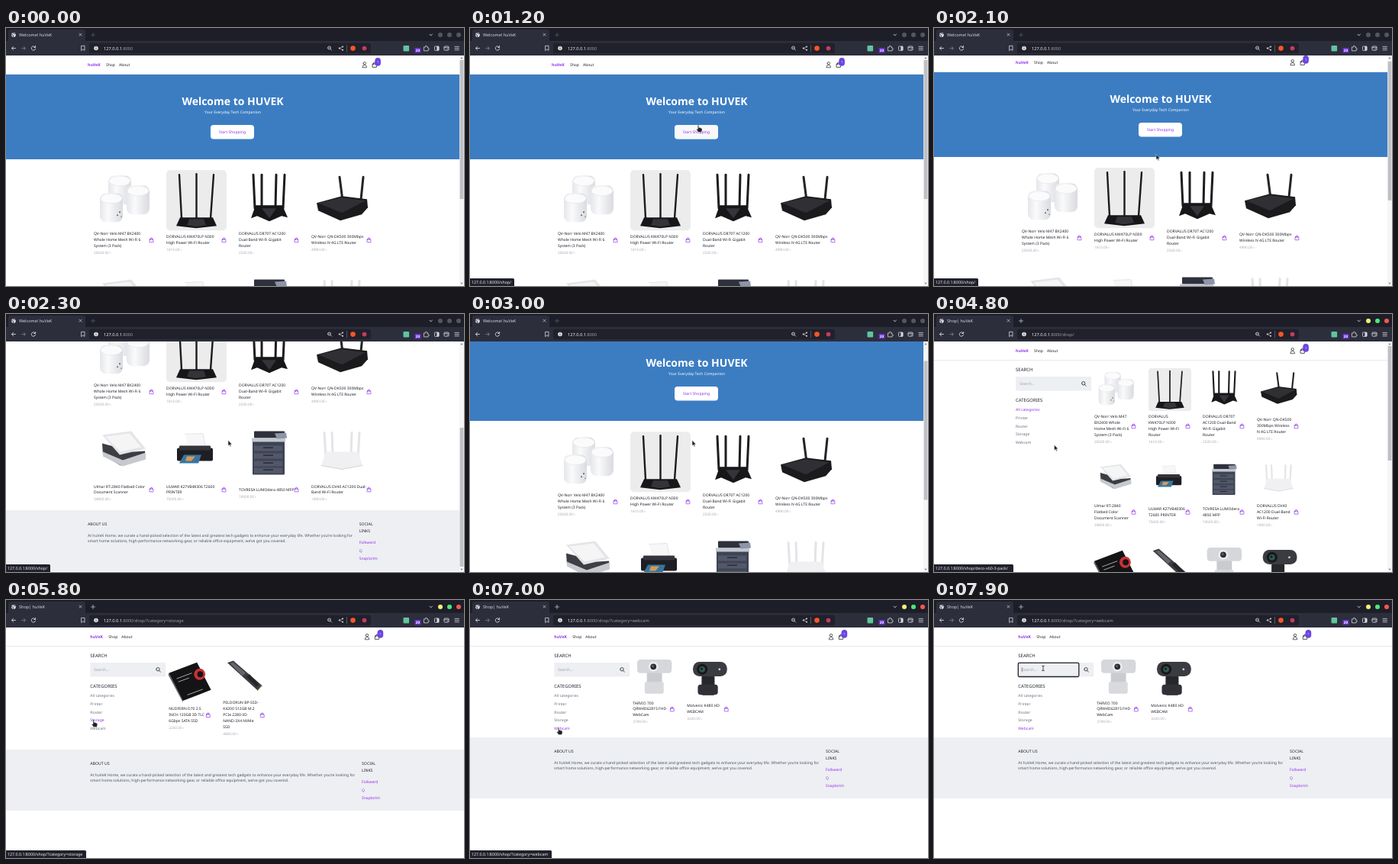
Animation, 600 px wide and 338 px high, one loop 8 s. Source, as an HTML page:

```html
<!DOCTYPE html>
<html lang="en">
<head>
<meta charset="utf-8">
<title>Shop tour</title>
<style>
  html, body { margin: 0; width: 100%; height: 100%; overflow: hidden; background: #fff; }
  svg { display: block; width: 100%; height: 100%; }
  text { font-family: "Noto Sans", "Open Sans", sans-serif; text-rendering: geometricPrecision; white-space: pre; }
  .line { fill: none; stroke-linecap: round; stroke-linejoin: round; }
</style>
</head>
<body>
<svg id="stage" viewBox="0 0 600 338"></svg>
<script>
const LOOP = 8000;
const INK = '#20222b', GRAY = '#6b7280', PALE = '#a3a8b2', PURPLE = '#9333ea', PANEL = '#edeff2';
const BAR = '#2d2e3b', DARK = '#20212b', LIGHT = '#d6d7df';

// --- drawing helpers ---
const text = (x, y, str, { size = 5, fill = INK, weight = 400, anchor = 'start', id = '' } = {}) =>
  `<text ${id && `id="${id}"`} x="${x}" y="${y}" font-size="${size}" fill="${fill}" font-weight="${weight}" text-anchor="${anchor}">${str}</text>`;
const rect = (x, y, w, h, fill, rx = 0, extra = '') =>
  `<rect x="${x}" y="${y}" width="${w}" height="${h}" fill="${fill}" rx="${rx}" ${extra}/>`;
const dot = (x, y, r, fill) => `<circle cx="${x}" cy="${y}" r="${r}" fill="${fill}"/>`;
const poly = (points, fill) => `<polygon points="${points}" fill="${fill}"/>`;
const line = (d, stroke, width = 1, extra = '') =>
  `<path class="line" d="${d}" stroke="${stroke}" stroke-width="${width}" ${extra}/>`;
const group = (id, body) => `<g id="${id}">${body}</g>`;

const bag = (x, y, color, scale = 0.29) => line(
  'M15.8 10.5V6a3.8 3.8 0 1 0-7.5 0v4.5M4.4 8.5 3.1 20.5q0 1.2 1.1 1.2h15.5q1.2 0 1.1-1.2l-1.3-12q-.1-1-1.1-1H5.5q-1 0-1.1 1z',
  color, 2.4, `transform="translate(${x} ${y}) scale(${scale}) translate(-12 -12)"`);
const magnifier = (x, y, color, r = 2.2) =>
  line(`M${x - r} ${y}a${r} ${r} 0 1 1 ${2 * r} 0a${r} ${r} 0 1 1 ${-2 * r} 0M${x + r * .75} ${y + r * .75}l${r * .8} ${r * .8}`, color, .8);

// --- product pictures, each in a 79 x 79 box ---
const pod = (x, y) =>
  rect(x, y, 30, 38, 'url(#pod)', 8) + `<ellipse cx="${x + 15}" cy="${y + 7}" rx="14" ry="6.5" fill="#fbfbfc" stroke="#dcdee2" stroke-width=".5"/>`;
const mast = (x1, y1, x2, y2, color, width = 2.4) => line(`M${x1} ${y1}L${x2} ${y2}`, color, width);
const art = {
  mesh: pod(19, 7) + pod(43, 20) + pod(8, 30) + dot(34, 55, 1, '#555') + dot(31, 59, 1, '#666') + dot(36, 61, .8, '#777'),
  triple: rect(0, 0, 79, 79, '#ececed', 5) + mast(17, 6, 20, 63, '#1c1c1e') + mast(39.5, 5, 39.5, 63, '#1c1c1e') + mast(62, 6, 58, 63, '#1c1c1e') +
    poly('18,62 61,62 66,73 39,76 13,73', '#17171a') + poly('30,64 49,64 52,72 39,74 27,72', '#333338'),
  quad: mast(19, 6, 21, 50, '#1d1d20', 3) + mast(30, 6, 30, 48, '#1d1d20', 3) + mast(49, 6, 48, 48, '#1d1d20', 3) + mast(60, 6, 58, 50, '#1d1d20', 3) +
    poly('22,46 57,46 64,62 56,60 40,67 24,60 16,63', '#17171a') + poly('30,50 49,50 40,63', '#34343a'),
  pair: mast(37, 9, 41, 40, '#242428', 3) + mast(68, 9, 65, 38, '#242428', 3) +
    poly('7,43 40,34 73,38 74,49 66,58 38,66 9,53', '#1b1b1e') + poly('9,43 40,36 71,40 40,56', '#303034'),
  scanner: poly('11,31 52,42 67,41 68,51 35,60 12,46', '#3c3e44') + poly('12,42 38,53 68,43 68,52 38,61 12,48', '#c6c9ce') +
    poly('11,20 49,15 68,38 34,46', '#e3e5e8') + poly('15,22 47,18 62,36 35,42', '#f5f5f6'),
  inkjet: poly('25,19 48,18 52,38 29,39', '#f7f7f8') + line('M25 19L48 18 52 38', '#d4d6da', .6) + rect(14, 37, 47, 17, '#1e1f24', 2) +
    rect(17, 34, 41, 6, '#34353b', 1) + poly('23,46 46,46 42,57 17,57', '#39759c') + poly('27,48 38,48 33,54 25,54', '#d49a5a'),
  copier: rect(18, 27, 42, 45, '#3f4454', 1) + rect(20, 15, 40, 9, '#2e313d', 1) + rect(17, 24, 44, 5, '#c2c6cf') + poly('47,18 62,17 63,24 50,25', '#8d95a8') +
    [34, 44, 54, 63].map(y => rect(20, y, 37, 7, '#525869', .6) + rect(32, y + 2, 13, 1.3, '#23252e')).join(''),
  white: [17, 27, 53, 63].map(x => mast(x, 17, x + (40 - x) * .08, 48, '#e3e4e7', 3)).join('') +
    poly('19,42 61,42 67,60 40,65 13,60', '#f0f0f2') + line('M13 60L40 65 67 60', '#d3d5d9', 1),
  ssd: poly('0,35 52,15 78,66 26,86', '#141416') + poly('0,35 26,86 26,89 -1,38', '#55565a') + dot(57, 37, 10.5, '#c93136') + dot(58, 37, 5.5, '#141416') +
    line('M15 45L42 35M18 51L37 44M35 75L62 65', '#a8a8ad', 1.4),
  stick: poly('8,16 19,12 72,58 64,67', '#3b3c40') + poly('13,17 19,15 42,35 36,40', '#65666b') + poly('43,42 49,37 66,55 62,60', '#25262a') + line('M64 67L72 58', '#b79a55', 1.5),
  camLight: rect(26, 31, 28, 38, '#c9cbcf', 3) + rect(22, 51, 35, 22, '#d9dade', 3) + rect(8, 10, 64, 25, '#d5d7da', 6) + dot(38, 23, 9, '#eceded') + dot(38, 23, 5.5, '#2c2d32') + dot(37, 22, 2, '#5e6d83'),
  camDark: rect(27, 39, 24, 37, '#26272b', 4) + rect(20, 56, 37, 19, '#303136', 5) + rect(11, 14, 63, 27, '#3b3c42', 12) + dot(28, 28, 10, '#17181b') + dot(28, 28, 5.5, '#30584d') + dot(27, 27, 2, '#121315') + dot(60, 28, 2, '#d3d4d8'),
};

// --- page parts ---
const card = (x, imageTop, side, middle, picture, lines, price) => {
  const first = middle - (lines.length - 1) * 3.95;
  return `<use href="#${picture}" transform="translate(${x} ${imageTop}) scale(${side / 79})"/>` +
    lines.map((str, i) => text(x, first + i * 7.9 + 1.8, str)).join('') +
    text(x, first + (lines.length - 1) * 7.9 + 10.8, `${price}.00 ৳`, { size: 4.7, fill: PALE }) +
    bag(x + (side > 60 ? 75.5 : 51.5), middle + .4, PURPLE);
};
const row = (left, pitch, top, side, middle, items) =>
  items.map((item, i) => card(left + i * pitch, top, side, middle, ...item)).join('');

const nav = rect(-10, 36, 620, 25, '#fff') + line('M-10 60.6H610', '#dfe2e7', .8) +
  text(107, 50, 'huVeK', { size: 5.2, weight: 600, fill: PURPLE }) + text(131, 50, 'Shop') + text(148, 50, 'About') +
  line('M468 46.2a1.7 1.7 0 1 1 3.4 0a1.7 1.7 0 1 1-3.4 0M466.9 51.4q0-3 2.8-3t2.8 3z', INK, .7) +
  bag(482.7, 48.3, INK, .32) + rect(483.3, 39, 7.6, 10.8, '#6a45e4', 3.8) + text(487.1, 46, '1', { size: 4, fill: '#fff', anchor: 'middle' });

const footer = top => rect(-10, top, 620, 80, PANEL) +
  text(107, top + 19.6, 'ABOUT US', { size: 5.2 }) +
  text(107, top + 34.6, 'At huVeK Home, we curate a hand-picked selection of the latest and greatest tech gadgets to enhance your everyday life. Whether you’re looking for', { fill: '#4b5563' }) +
  text(107, top + 42.4, 'smart home solutions, high-performance networking gear, or reliable office equipment, we’ve got you covered.', { fill: '#4b5563' }) +
  text(462.7, top + 19.6, 'SOCIAL', { size: 5.2 }) + text(462.7, top + 29, 'LINKS', { size: 5.2 }) +
  ['Folkwerd', 'Q', 'Snaplorim'].map((name, i) => text(462.7, top + 44.3 + i * 10.5, name, { fill: PURPLE })).join('');

const sidebar = (page, active) =>
  text(107, 75.3, 'SEARCH', { size: 6 }) + rect(107, 82, 99, 18.6, PANEL, 1) + text(112, 93.2, 'Search...', { fill: '#9ca3af' }) +
  magnifier(195.7, 90.8, INK) + text(107, 115.3, 'CATEGORIES', { size: 6 }) +
  ['All categories', 'Printer', 'Router', 'Storage', 'Webcam'].map((name, i) =>
    text(107, 127.4 + i * 10.6, name, { fill: i === active ? PURPLE : GRAY, id: `${page}-${i}` })).join('');

const scrollbar = (id, length) => rect(594, 36, 6, 302, '#f6f6f7') + rect(594.6, 42, 4.8, length, '#bfc0c4', 0, `id="${id}"`) +
  poly('595.5,40.3 597,38.3 598.5,40.3', '#6c6d72') + poly('595.5,333.7 597,335.7 598.5,333.7', '#6c6d72');
const paper = rect(0, 36, 600, 302, '#fff');

const home = paper + group('homeScroll',
  nav + rect(0, 61, 594, 111, '#3c7dc2') +
  text(297, 101, 'Welcome to HUVEK', { size: 14, weight: 700, fill: '#fff', anchor: 'middle' }) +
  text(297, 111.6, 'Your Everyday Tech Companion', { fill: '#fff', anchor: 'middle' }) +
  rect(268, 127, 57, 18.4, '#fff', 4) + rect(268, 127, 57, 18.4, '#f3f4f6', 4, 'id="buttonHover"') +
  text(296.5, 138, 'Start Shopping', { fill: PURPLE, anchor: 'middle' }) +
  row(115, 95, 186.3, 79, 277.5, [
    ['mesh', ['QV-Norr Velo M47 BX2400', 'Whole Home Mesh Wi-Fi 6', 'System (3 Pack)'], 20500],
    ['triple', ['DORVALUS KW470LP N300', 'High Power Wi-Fi Router'], 1610],
    ['quad', ['DORVALUS DR70T AC1200', 'Dual-Band Wi-Fi Gigabit', 'Router'], 2530],
    ['pair', ['QV-Norr QN-DK500 300Mbps', 'Wireless N 4G LTE Router'], 4990]]) +
  row(115, 95, 314.5, 79, 405.7, [
    ['scanner', ['Ulmar RT-2840 Flatbed Color', 'Document Scanner'], 34800],
    ['inkjet', ['ULMAR K27VB48306 T2600', 'PRINTER'], 75000],
    ['copier', ['TOVRESA LUMOdera 4850 MFP'], 74500],
    ['white', ['DORVALUS DV40 AC1200 Dual-', 'Band Wi-Fi Router'], 1690]]) +
  footer(433)) + scrollbar('homeThumb', 182);

const drive = ['ssd', ['NUDFERN D70 2.5', 'INCH 120GB 3D TLC', '6Gbps SATA SSD'], 2250];
const stick = ['stick', ['PELDORUN BP-SSD-', 'K4200 512GB M.2', 'PCIe 2280-3D', 'NAND-3X4 NVMe', 'SSD'], 4800];
const camA = ['camLight', ['TARVIO 700', 'QRW4D62815 FHD', 'WebCam'], 3799];
const camB = ['camDark', ['Molvenic K480 HD', 'WEBCAM'], 3200];
const shopRow = (top, middle, items) => row(210, 71, top, 56, middle, items);

const shop = paper + nav + sidebar('shop', 0) +
  shopRow(71, 146.5, [
    ['mesh', ['QV-Norr Velo M47', 'BX2400 Whole', 'Home Mesh Wi-Fi 6', 'System (3 Pack)'], 20500],
    ['triple', ['DORVALUS', 'KW470LP N300', 'High Power Wi-Fi', 'Router'], 1610],
    ['quad', ['DORVALUS DR70T', 'AC1200 Dual-Band', 'Wi-Fi Gigabit', 'Router'], 2530],
    ['pair', ['QV-Norr QN-DK500', '300Mbps Wireless', 'N 4G LTE Router'], 4990]]) +
  shopRow(186, 259, [
    ['scanner', ['Ulmar RT-2840', 'Flatbed Color', 'Document Scanner'], 34800],
    ['inkjet', ['ULMAR K27VB48306', 'T2600 PRINTER'], 75000],
    ['copier', ['TOVRESA LUMOdera', '4850 MFP'], 74500],
    ['white', ['DORVALUS DV40', 'AC1200 Dual-Band', 'Wi-Fi Router'], 1690]]) +
  shopRow(299, 380, [drive, stick, camA, camB]) + scrollbar('shopThumb', 150);

// pages without a scrollbar sit further right
const shortPage = body => paper + `<g transform="translate(3.3)">${nav}${body}</g>`;
const storage = shortPage(sidebar('storage', 3) + shopRow(71, 150.4, [drive, stick]) + footer(196));
const webcam = shortPage(sidebar('webcam', 4) + shopRow(71, 142.6, [camA, camB]) + footer(180) +
  group('focus', rect(107, 82.3, 79.5, 18.2, 'none', 1.5, `stroke="${INK}" stroke-width="1.3"`) + line('M112 89v5', INK, .5)));

// --- browser frame ---
const address = (id, path) => group(id, text(128, 28.8,
  `<tspan fill="#f2f2f5">127.0.0.1</tspan>:8000${path}`, { size: 5.65, fill: '#9a9ba8' }));
const tabTitle = (id, str) => group(id, text(17, 11, str, { size: 5.5, fill: LIGHT }));
const windowButtons = (id, colors, plus) => group(id,
  colors.map((color, i) => dot(569 + i * 12, 9, 3, color)).join('') + line('M111.5 9h5M114 6.5v5', plus, .7));
const browser = rect(0, 0, 600, 36, '#1d1e27') + rect(3, 2, 101, 18, BAR, 3) + rect(0, 17, 600, 19, BAR) +
  group('globe', dot(10, 9, 2.9, LIGHT) + line('M7.4 8.2l2 1.3.2 2M9 6.4l2 1 1.5-.3', BAR, .8)) +
  group('spinner', line('M10 6.3a2.7 2.7 0 1 1-2.7 2.7', '#8b7be8', .9)) +
  tabTitle('titleHome', 'Welcome! huVeK') + tabTitle('titleShop', 'Shop| huVeK') +
  line('M96 7.2l3 3m0-3l-3 3', LIGHT, .7) + line('M555 8.2l1.7 1.7 1.7-1.7', LIGHT, .9) +
  windowButtons('inactive', ['#55565f', '#55565f', '#55565f'], '#5f606c') +
  windowButtons('active', ['#f1f07c', '#50e87b', '#ff5555'], LIGHT) +
  line('M12.5 26.5h-5m2.2-2.3-2.3 2.3 2.3 2.3', LIGHT, .9) + line('M20.5 26.5h5m-2.2-2.3 2.3 2.3-2.3 2.3', '#777887', .9) +
  line('M38.4 25.3a2.7 2.7 0 1 0 .2 2M38.6 23.6v1.9h-1.9', LIGHT, .9) + line('M99 23.4h4v6l-2-1.6-2 1.6z', LIGHT, .8) +
  rect(109, 19.8, 369, 13.4, DARK, 2.5) + dot(118, 26.5, 2.8, '#e4e4e9') + line('M118 26.2v1.6M118 24.8v.1', DARK, .7) +
  address('urlHome', '') + address('urlShop', '/shop/') + address('urlStorage', '/shop/?category=storage') + address('urlWebcam', '/shop/?category=webcam') +
  magnifier(423.5, 26, LIGHT, 2) + line('M422.6 26h1.8', LIGHT, .6) +
  line('M441 24.5l-4.2 2 4.2 2.2', LIGHT, .6) + dot(441, 24.5, 1, LIGHT) + dot(436.7, 26.5, 1, LIGHT) + dot(441, 28.8, 1, LIGHT) +
  line('M446.5 22.5v8.5', '#8a8b96', .5) + dot(454.5, 26.6, 3.3, '#fb542b') + dot(469.5, 26.6, 2.9, '#c43a62') +
  rect(520.5, 23, 7.6, 7.4, '#5fc5a0', 1) + rect(535.5, 26, 8, 6.6, '#6a31d6', 1) + text(539.5, 31.2, '20', { size: 4.6, weight: 700, fill: '#fff', anchor: 'middle' }) +
  line('M547.8 25h1.6q-.3-1.8 1-1.8t1 1.8h1.5v1.7q1.5-.2 1.5 1t-1.5 1v1.2h-5.1z', LIGHT, .8) +
  rect(561.5, 24, 5.6, 5.4, 'none', .8, `stroke="${LIGHT}" stroke-width=".8"`) + rect(564.4, 24, 2.7, 5.4, LIGHT) +
  rect(574, 24, 6, 5.2, 'none', 1, `stroke="${LIGHT}" stroke-width=".8"`) + line('M574 25.7h6M578 27.6h1', LIGHT, .8) +
  line('M588 24.4h5.4M588 26.6h5.4M588 28.8h5.4', LIGHT, .8);

const status = (id, path, width) => group(id, rect(-2, 328, width + 2, 12, DARK, 1.5) +
  text(2, 335, `127.0.0.1:8000${path}`, { size: 5.3, fill: '#eeeef2' }));
const pointer = group('cursor',
  group('arrow', '<path d="M0 0V7.2L1.7 5.7 2.8 8.2 4 7.7 2.9 5.3H5.2Z" fill="#202124" stroke="#fff" stroke-width=".45"/>') +
  group('hand', '<path d="M-.7 0Q0-.8.7 0V3.4Q2.2 3 2.4 3.8 3.6 3.5 3.8 4.4 5 4.2 5 5.2V7.2L4.2 9.4H0L-2.4 6Q-2.4 4.8-.7 5.8Z" fill="#202124" stroke="#fff" stroke-width=".45"/>') +
  group('beam', line('M-1.4-3.2Q0-3.2 0-2.4 0-3.2 1.4-3.2M0-2.6V2.6M-1.4 3.2Q0 3.2 0 2.4 0 3.2 1.4 3.2', '#202124', .8)));

document.getElementById('stage').innerHTML =
  '<defs><linearGradient id="pod"><stop stop-color="#e4e6ea"/><stop offset=".35" stop-color="#fafafb"/><stop offset="1" stop-color="#d9dbe0"/></linearGradient>' +
  Object.entries(art).map(([id, body]) => group(id, body)).join('') + '</defs>' +
  group('home', home) + group('shop', shop) + group('storage', storage) + group('webcam', webcam) +
  status('linkShop', '/shop/', 58) + status('linkMesh', '/shop/deco-x60-3-pack/', 104) + status('linkRouter', '/shop/?category=router', 102) +
  status('linkStorage', '/shop/?category=storage', 105) + status('linkWebcam', '/shop/?category=webcam', 107) +
  browser + pointer;

// --- motion: every track is a function of the loop time ---
const tracks = [];
const track = (id, apply) => {
  const node = document.getElementById(id);
  tracks.push(t => apply(node, t));
};
const within = (t, spans) => spans.some(([from, to]) => t >= from && t < to);
const show = (id, ...spans) =>
  track(id, (node, t) => { node.style.display = within(t, spans) ? '' : 'none'; });
const tint = (id, base, ...spans) =>
  track(id, (node, t) => node.setAttribute('fill', within(t, spans) ? PURPLE : base));

// points are [time, ...values], joined by straight lines
function sample(points, t) {
  const next = points.findIndex(([ms]) => ms > t);
  if (next < 0) return points.at(-1).slice(1);
  const [start, ...from] = points[next - 1], [end, ...to] = points[next];
  return from.map((value, i) => value + (to[i] - value) * (t - start) / (end - start));
}
const move = (id, points) =>
  track(id, (node, t) => node.setAttribute('transform', `translate(${sample(points, t).join(' ')})`));
const fade = (id, points) =>
  track(id, (node, t) => node.setAttribute('opacity', sample(points, t)[0]));

const CLICK = 3900, OPEN_SHOP = 4100, OPEN_STORAGE = 5700, OPEN_WEBCAM = 6900;
for (const [page, url, from, to] of [
  ['home', 'urlHome', 0, OPEN_SHOP], ['shop', 'urlShop', OPEN_SHOP, OPEN_STORAGE],
  ['storage', 'urlStorage', OPEN_STORAGE, OPEN_WEBCAM], ['webcam', 'urlWebcam', OPEN_WEBCAM, LOOP]]) {
  show(page, [from, to]);
  show(url, [from, to]);
}
show('titleHome', [0, OPEN_SHOP]);
show('titleShop', [OPEN_SHOP, LOOP]);
show('inactive', [0, CLICK]);
show('active', [CLICK, LOOP]);
show('spinner', [4000, 4200], [5700, 5800], [6800, 7000]);
show('globe', [0, 4000], [4200, 5700], [5800, 6800], [7000, LOOP]);

const scroll = [[0, 0], [2000, 0], [2100, 3], [2200, 110], [2300, 176], [2700, 176], [2800, 158], [2900, 95], [3000, 32], [3100, 0]];
move('homeScroll', scroll.map(([ms, y]) => [ms, 0, -y]));
move('homeThumb', scroll.map(([ms, y]) => [ms, 0, y * 107 / 176]));

move('cursor', [
  [0, 12, 345], [200, 14, 328], [600, 170, 226], [1000, 299, 127], [1600, 299, 127], [1800, 291, 136], [1900, 291, 136],
  [2100, 291, 165.5], [3100, 291, 165.5], [3500, 285, 147], [3600, 285, 147], [3800, 288, 137], [4300, 288, 137],
  [4600, 228, 108], [4800, 157.5, 171.5], [5000, 136, 164], [5200, 117, 150], [5400, 114.7, 157],
  [6000, 114.7, 157], [6300, 116, 167], [7100, 116, 167], [7500, 119, 166], [7600, 119, 166], [7900, 143, 89.5]]);
show('cursor', [200, LOOP]);
show('hand', [1000, 2000], [3700, 4100], [4500, 4700], [5200, 7700]);
show('beam', [7800, LOOP]);
show('arrow', [200, 1000], [2000, 3700], [4100, 4500], [4700, 5200], [7700, 7800]);

show('linkShop', [1100, 2600], [3800, OPEN_SHOP]);
show('linkMesh', [4500, 5200]);
show('linkRouter', [5200, 5300]);
show('linkStorage', [5300, 6300]);
show('linkWebcam', [6300, 7800]);
show('focus', [7900, LOOP]);

fade('buttonHover', [[0, 0], [900, 0], [1400, 1], [1900, 1], [2100, 0], [3600, 0], [3900, 1]]);
tint('shop-2', GRAY, [5200, 5300]);
tint('shop-3', GRAY, [5300, OPEN_STORAGE]);
tint('storage-4', GRAY, [6300, OPEN_WEBCAM]);

const TICK = 100, LEAD = 20;
const began = performance.now();
function render() {
  const elapsed = performance.now() - began + LEAD;
  const t = Math.floor(elapsed / TICK) * TICK % LOOP;
  tracks.forEach(update => update(t));
  requestAnimationFrame(render);
}
render();
</script>
</body>
</html>
```
